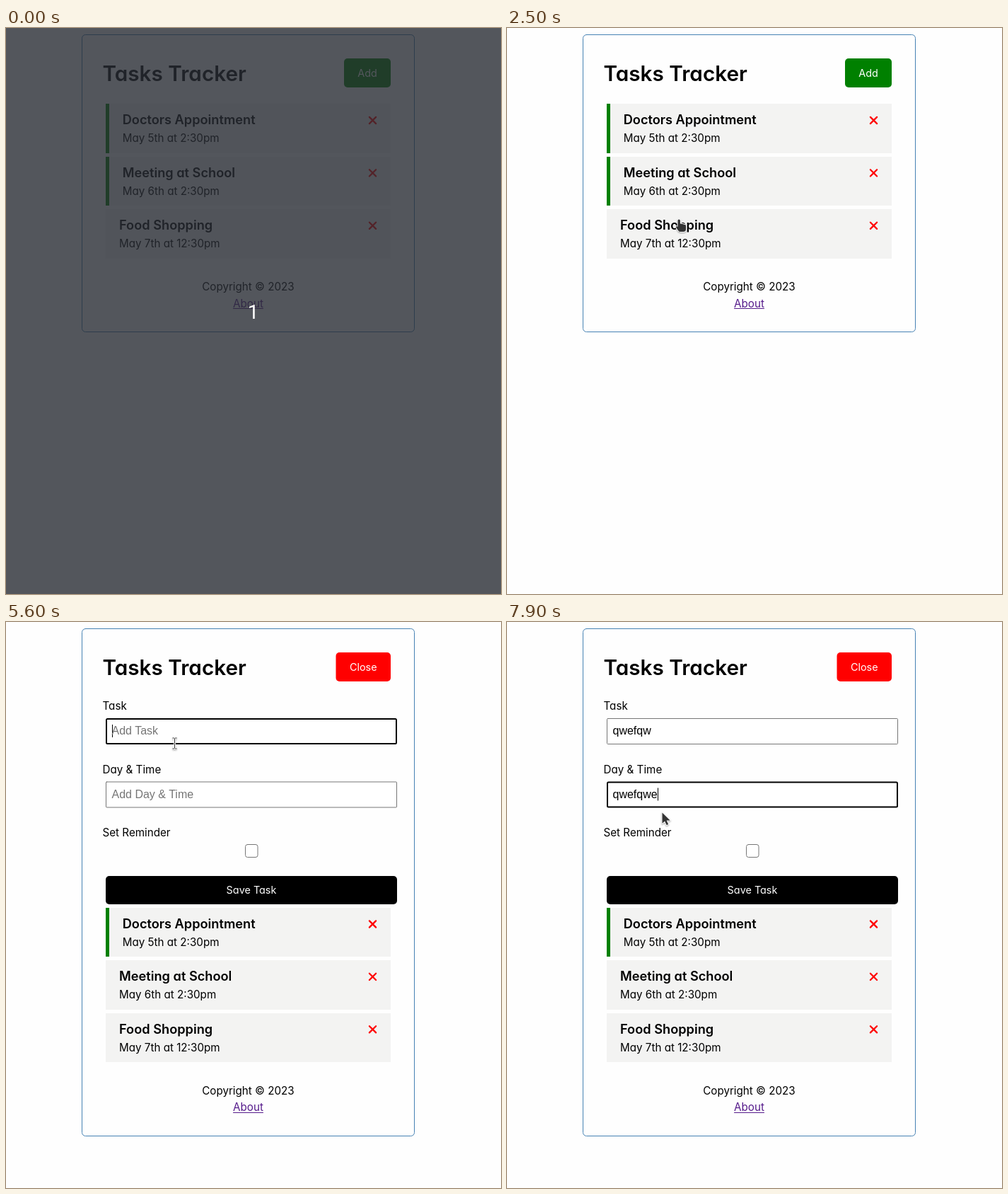
Recreate the animation shown at these times as an HTML page with a canvas. Size 700 by 800 pixels, loop 8 s.

```html
<!DOCTYPE html>
<html lang="en">
<head>
<meta charset="utf-8">
<title>Tasks Tracker</title>
<style>
html, body { margin: 0; width: 100%; height: 100%; overflow: hidden; background: #fefefe; }
canvas, svg { position: absolute; left: 0; top: 0; width: 700px; height: 800px; }
text { font: 15.2px Inter, "Open Sans", sans-serif; font-feature-settings: "cv11"; white-space: pre; }
.title { font-size: 29.7px; font-weight: 600; }
.task { font-size: 18.2px; font-weight: 600; }
.button { font-size: 14.4px; }
.field { font: 16px "Liberation Sans", Arial, sans-serif; }
</style>
</head>
<body>
<canvas id="shapes" width="700" height="800"></canvas>
<svg id="words" viewBox="0 0 700 800"></svg>
<canvas id="top" width="700" height="800"></canvas>
<script>
const ctx = document.getElementById('shapes').getContext('2d');
const top2d = document.getElementById('top').getContext('2d');
const words = document.getElementById('words');
const LOOP = 8000, STEP = 100;
const ROW_TOP = 107.2, ROW_STEP = 74.4, ROW_HEIGHT = 69.7;
const FORM_SHIFT = 296.5, FORM_OPEN = 5100;

const tasks = [
  { name: 'Doctors Appointment', when: 'May 5th at 2:30pm' },
  { name: 'Meeting at School', when: 'May 6th at 2:30pm' },
  { name: 'Food Shopping', when: 'May 7th at 12:30pm' }
];

// Selected words: start, end, row, line, word
const selections = [
  [1300, 1800, 1, 'name', 'Meeting'],
  [1900, 2500, 1, 'name', 'Meeting'],
  [2700, 3300, 2, 'name', 'Shopping'],
  [3400, 3900, 2, 'name', 'Shopping'],
  [4000, FORM_OPEN, 1, 'when', '2']
];

// Pointer path: time, x, y
const path = [
  [400, 668, 353], [500, 505, 292], [600, 345, 238], [700, 252, 216], [900, 207, 210],
  [1400, 207, 210], [1600, 209, 221], [1700, 209, 221], [1800, 208, 214], [2000, 208, 213],
  [2300, 235, 257], [2500, 243, 270], [3400, 243, 270], [3600, 244, 261], [3900, 248, 227],
  [4200, 248, 227], [4400, 440, 186], [4700, 515, 60], [4900, 505, 46], [5100, 505, 46],
  [5200, 598, 280], [5300, 530, 519], [5500, 270, 192], [5600, 238, 171], [6100, 227, 168],
  [6200, 204, 160], [6300, 193, 178], [6600, 212, 245], [7400, 212, 245], [7900, 219, 269]
];

const between = (t, a, b) => t >= a && t < b;

// Text elements are reused from one drawing to the next
const pool = [];
let used = 0;

function text(str, x, y, style, color = '#000', anchor = 'start') {
  const el = pool[used] || words.appendChild(document.createElementNS(words.namespaceURI, 'text'));
  pool[used++] = el;
  const attrs = { x, y, class: style, fill: color, 'text-anchor': anchor };
  for (const key in attrs) el.setAttribute(key, attrs[key]);
  el.textContent = str;
  return el;
}

function rect(x, y, w, h, color) {
  ctx.fillStyle = color;
  ctx.fillRect(x, y, w, h);
}

function box(x, y, w, h, r, fill, stroke, line = 1) {
  ctx.beginPath();
  ctx.roundRect(x, y, w, h, r);
  if (fill) { ctx.fillStyle = fill; ctx.fill(); }
  if (stroke) { ctx.strokeStyle = stroke; ctx.lineWidth = line; ctx.stroke(); }
}

function button(label, x, y, w, h, color, inset = 0) {
  box(x + inset, y + inset, w - 2 * inset, h - 2 * inset, 5, color);
  text(label, x + w / 2, y + h / 2 + 5.3, 'button', '#fff', 'middle');
}

function isReminder(row, t) {
  if (row === 0) return true;
  if (row === 1) return t < 1400 || between(t, 2000, 4100);
  return between(t, 2800, 3400);
}

function line(str, x, y, style, word, top, height) {
  const el = text(str, x, y, style);
  if (!word) return;
  const at = str.indexOf(word);
  const start = at ? el.getSubStringLength(0, at) : 0;
  rect(x + start, top, el.getSubStringLength(at, word.length), height, '#3063c9');
  el.innerHTML = str.replace(word, `<tspan fill="#fff">${word}</tspan>`);
}

function taskRow(row, y, t) {
  const on = isReminder(row, t);
  const x = on ? 164.7 : 160;
  const top = Math.round(y), height = Math.round(y + ROW_HEIGHT) - top;
  const sel = selections.find(s => s[2] === row && between(t, s[0], s[1])) || [];
  const word = key => sel[3] === key && sel[4];
  rect(141, top, 403, height, '#f3f3f2');
  if (on) rect(141, top, 5, height, '#008000');
  line(tasks[row].name, x, y + 29, 'task', word('name'), top + 9, 28);
  line(tasks[row].when, x, y + 54, 'body', word('when'), top + 36, 24);

  const cx = 518.5, cy = y + 23.3, r = 4.6;
  ctx.beginPath();
  ctx.moveTo(cx - r, cy - r); ctx.lineTo(cx + r, cy + r);
  ctx.moveTo(cx + r, cy - r); ctx.lineTo(cx - r, cy + r);
  ctx.strokeStyle = '#f00';
  ctx.lineWidth = 2.3;
  ctx.lineCap = 'round';
  ctx.stroke();
}

function field(label, hint, value, y, focused) {
  text(label, 136.5, y - 12, 'body');
  if (focused) box(142, y + 1, 410, 35, 1.5, '#fff', '#000', 2);
  else box(141.5, y + 0.5, 411, 36, 1, '#fff', '#767676');
  const el = text(value || hint, 149.5, y + 23, 'field', value ? '#000' : '#757575');
  if (focused) {
    const width = value ? el.getComputedTextLength() : 0;
    rect(Math.round(149.5 + width), y + 9, 1, 18, '#000');
  }
}

function typed(str, t, start, end) {
  const n = Math.floor(str.length * (t - start + STEP) / (end - start + STEP) + 0.01);
  return str.slice(0, Math.max(0, n));
}

function form(t) {
  field('Task', 'Add Task', typed('qwefqw', t, 5700, 6100), 136, between(t, 5600, 6900));
  field('Day & Time', 'Add Day & Time', typed('qwefqwe', t, 7400, 7900), 225.5, t >= 6900);
  text('Set Reminder', 136.5, 303, 'body');
  box(338.5, 314.5, 17.5, 18, 3, '#fff', '#767676');
  button('Save Task', 141, 359, 412, 40, '#000');
}

function page(t) {
  const open = t >= FORM_OPEN;
  const shift = open ? FORM_SHIFT : 0;
  rect(0, 0, 700, 800, '#fefefe');
  box(107.5, 9.5, 470, open ? 717 : 420, 5, null, '#4682b4');
  text('Tasks Tracker', 136.5, 74.5, 'title');
  if (open) {
    button('Close', 466.5, 43, 77.5, 41, '#f00');
    form(t);
  } else {
    button('Add', 478, 43, 66, 41, '#008000', t >= 5000 ? 0.8 : 0);
  }
  tasks.forEach((_, i) => taskRow(i, ROW_TOP + shift + i * ROW_STEP, t));
  text('Copyright © 2023', 342.5, 371 + shift, 'body', '#000', 'middle');
  const link = text('About', 342.5, 394.7 + shift, 'body', '#551a8b', 'middle');
  const width = link.getComputedTextLength();
  rect(342.5 - width / 2, Math.round(396 + shift), width, 1, '#551a8b');
}

function pointerAt(t) {
  const i = path.findIndex(p => p[0] > t);
  if (i < 0) return path[path.length - 1].slice(1);
  const [t0, x0, y0] = path[i - 1], [t1, x1, y1] = path[i];
  const k = (t - t0) / (t1 - t0);
  return [x0 + (x1 - x0) * k, y0 + (y1 - y0) * k];
}

function pointerKind(x, y, t) {
  const open = t >= FORM_OPEN;
  const inside = (x0, y0, x1, y1) => x >= x0 && x <= x1 && y >= y0 && y <= y1;
  if (open && (inside(141, 136, 553, 173) || inside(141, 225, 553, 262))) return 'beam';
  if (open && inside(141, 359, 553, 399)) return 'hand';
  if (inside(open ? 466 : 478, 43, 544, 84)) return 'hand';
  const top = ROW_TOP + (open ? FORM_SHIFT : 0);
  return inside(141, top, 544, top + 218.5) ? 'hand' : 'arrow';
}

const pointers = {
  arrow: new Path2D('M0 0V15.2L3.6 11.9L6.1 17.6L8.7 16.4L6.2 11H11.2Z'),
  hand: new Path2D('M-2 1.6Q-2 0 -.4 0Q1.4 0 1.4 1.8V6.2Q2.8 5.4 4 6.6Q5.6 6 6.8 7.4' +
    'Q9.6 7 9.6 9.6V13Q9.6 17.6 5.6 17.6H1.6Q-.6 17.6 -2 15L-4.6 11Q-5 9 -2 10.2Z'),
  beam: new Path2D('M-3 -7.5H-1L0 -6.7L1 -7.5H3M0 -6.7V6.7M-3 7.5H-1L0 6.7L1 7.5H3')
};

function pointer(t) {
  if (t < path[0][0]) return;
  const [x, y] = pointerAt(t);
  const kind = pointerKind(x, y, t);
  const shape = pointers[kind];
  const c = top2d;
  c.save();
  c.translate(Math.round(x) + 0.5, Math.round(y) + 0.5);
  c.lineJoin = 'round';
  c.strokeStyle = '#fff';
  c.lineWidth = kind === 'beam' ? 3 : 2;
  c.shadowColor = 'rgba(0,0,0,.35)';
  c.shadowBlur = 2;
  c.shadowOffsetY = 1;
  c.stroke(shape);
  c.shadowColor = 'transparent';
  if (kind === 'beam') {
    c.strokeStyle = '#333';
    c.lineWidth = 1;
    c.stroke(shape);
  } else {
    c.fillStyle = '#333';
    c.fill(shape);
  }
  c.restore();
}

function countdown() {
  top2d.fillStyle = 'rgba(40,44,52,.8)';
  top2d.fillRect(0, 0, 700, 800);
  top2d.font = '28px Roboto, "Open Sans", sans-serif';
  top2d.textAlign = 'center';
  top2d.fillStyle = '#fff';
  top2d.fillText('1', 349.5, 411);
}

let shown = -1;

function draw() {
  const t = Math.floor(performance.now() % LOOP / STEP) * STEP;
  if (t !== shown) {
    shown = t;
    used = 0;
    page(t);
    pool.slice(used).forEach(el => { el.textContent = ''; });
    top2d.clearRect(0, 0, 700, 800);
    pointer(t);
    if (t < STEP) countdown();
  }
  requestAnimationFrame(draw);
}
draw();
</script>
</body>
</html>
```
